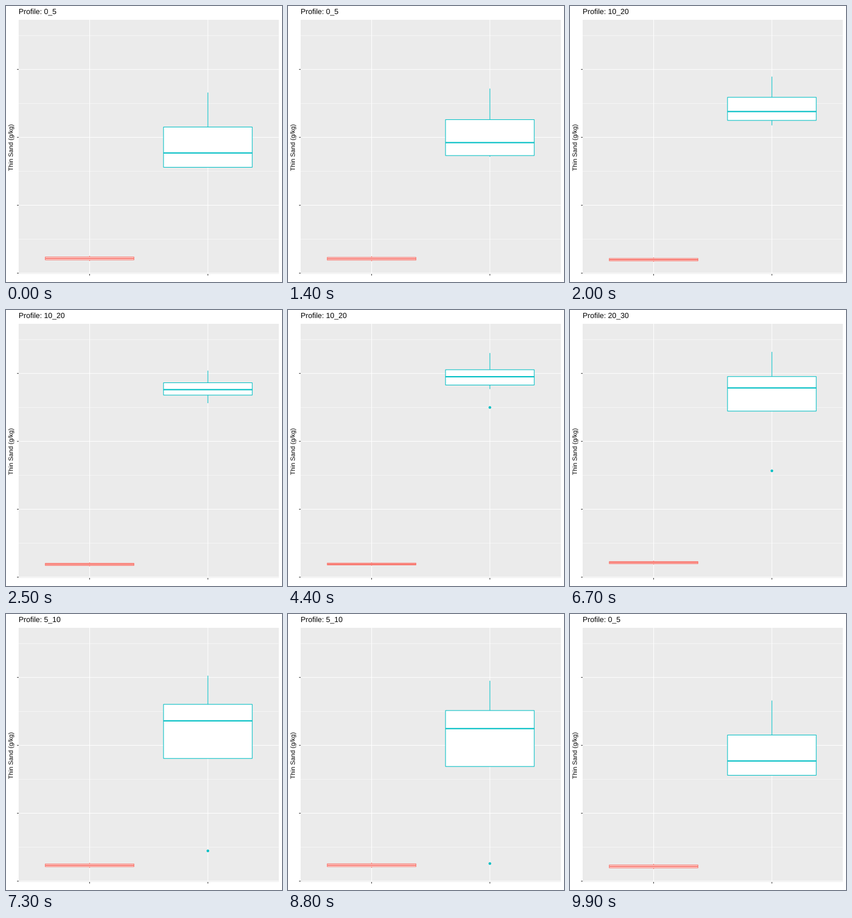
A matplotlib script for the animation above (10000 ms loop, 480 by 480 pixels).

```python
import matplotlib.pyplot as plt
from matplotlib.animation import FuncAnimation
from matplotlib.patches import Circle, Rectangle

SIZE, DPI = 480, 72  # at 72 dpi one point is one pixel
FRAMES, INTERVAL = 100, 100

LEFT, RIGHT, TOP, BOTTOM = 22, 474.5, 24, 466
MIDDLE = (TOP + BOTTOM) / 2
UNIT = (RIGHT - LEFT) / 2.2
CENTERS = [LEFT + 0.6 * UNIT, LEFT + 1.6 * UNIT]
HALF = 0.375 * UNIT
COLORS = ["#F8766D", "#00BFC4"]
LINE = 1.07


def mix(a, b, p):
    return a + (b - a) * p


def around(center, spread):
    """Five evenly balanced samples around a center."""
    return [center + spread * k for k in (-1.8, -1, 0, 1, 1.8)]


def box_stats(samples):
    """Whisker ends and quartiles of five samples, and the low outlier if any."""
    top, q3, median, q1, low = samples
    fence = q1 + 1.5 * (q1 - q3)
    if low > fence:
        return (top, q3, median, q1, q1), low
    return (top, q3, median, q1, low), None


class Profile:
    """Samples of both groups (as heights on stage) and the move that follows."""

    def __init__(self, name, first, second, leave, arrive):
        self.name = name
        self.groups = [box_stats(first), box_stats(second)]
        self.leave, self.arrive = leave, arrive

    def progress(self, frame):
        return max(0, (frame - self.leave) / (self.arrive - self.leave))


PROFILES = [
    Profile("0_5", around(439, 2.5), [150.5, 210.5, 255.6, 280.5, 280.5], 12, 25),
    Profile("10_20", around(442.4, 1.9), [105.5, 126.5, 138.5, 148, 162], 38, 50),
    Profile("20_30", around(441.2, 1.4), [44.1, 81.3, 93.6, 113, 169.5], 62, 74),
    Profile("5_10", around(436.7, 2.5), [113, 164, 194.2, 263.8, 434], 87, 99),
]


def locate(frame):
    """Return the current profile, the next one and the progress between."""
    for i, now in enumerate(PROFILES):
        if frame < now.arrive:
            return now, PROFILES[(i + 1) % len(PROFILES)], now.progress(frame)
    return PROFILES[0], PROFILES[1], 0


def blend_outlier(a, b, p):
    """An outlier without a partner stands still until the move is over."""
    if p == 0 or b is None:
        return a
    return b if a is None else mix(a, b, p)


plt.rcParams.update({"font.family": "Liberation Sans", "text.hinting": "none"})
fig = plt.figure(figsize=(SIZE / DPI, SIZE / DPI), dpi=DPI, facecolor="white")
ax = fig.add_axes([0, 0, 1, 1])
ax.set_xlim(0, SIZE)
ax.set_ylim(SIZE, 0)
ax.axis("off")


def line(xs, ys, color, width, z):
    return ax.plot(xs, ys, color=color, lw=width, zorder=z, snap=False,
                   solid_capstyle="butt")[0]


class Box:
    def __init__(self, x, color):
        self.x = x
        self.upper = line([x, x], [0, 0], color, LINE, 4)
        self.lower = line([x, x], [0, 0], color, LINE, 4)
        self.body = ax.add_patch(Rectangle(
            (x - HALF, 0), 2 * HALF, 0, fc="white", ec=color, lw=LINE,
            joinstyle="miter", snap=False, zorder=5))
        self.median = line([x - HALF, x + HALF], [0, 0], color, 2 * LINE, 6)
        self.dot = ax.add_patch(Circle((x, 0), 2.3, fc=color, ec="none",
                                       zorder=3))

    def place(self, top, q3, median, q1, low, outlier):
        self.upper.set_ydata([top, q3])
        self.lower.set_ydata([q1, low])
        self.body.set_y(q3)
        self.body.set_height(q1 - q3)
        self.median.set_ydata([median, median])
        self.dot.set_visible(outlier is not None)
        self.dot.center = (self.x, outlier or 0)


ax.add_patch(Rectangle((LEFT, TOP), RIGHT - LEFT, BOTTOM - TOP,
                       fc="#EBEBEB", ec="none", snap=False, zorder=0))
for k in range(4):
    y = 464.6 - 118.1 * k
    line([LEFT, RIGHT], [y - 59.05] * 2, "white", LINE / 2, 1)
    line([LEFT, RIGHT], [y, y], "white", LINE, 2)
    line([LEFT - 2.75, LEFT], [y, y], "#333333", LINE, 2)
for x in CENTERS:
    line([x, x], [TOP, BOTTOM], "white", LINE, 2)
    line([x, x], [BOTTOM, BOTTOM + 2.75], "#333333", LINE, 2)

title = ax.text(LEFT, 14, "", size=13, color="black", va="baseline")
ax.text(14, MIDDLE, "Thin Sand (g/kg)", size=11, color="black", rotation=90,
        rotation_mode="anchor", ha="center", va="baseline")
boxes = [Box(x, color) for x, color in zip(CENTERS, COLORS)]


def update(frame):
    now, then, p = locate(frame)
    title.set_text("Profile: " + (then if p > 0.5 else now).name)
    for box, (a, dot_a), (b, dot_b) in zip(boxes, now.groups, then.groups):
        box.place(*(mix(u, v, p) for u, v in zip(a, b)),
                  blend_outlier(dot_a, dot_b, p))
    return []


anim = FuncAnimation(fig, update, frames=FRAMES, interval=INTERVAL,
                     repeat=True, repeat_delay=0)
plt.show()
```
